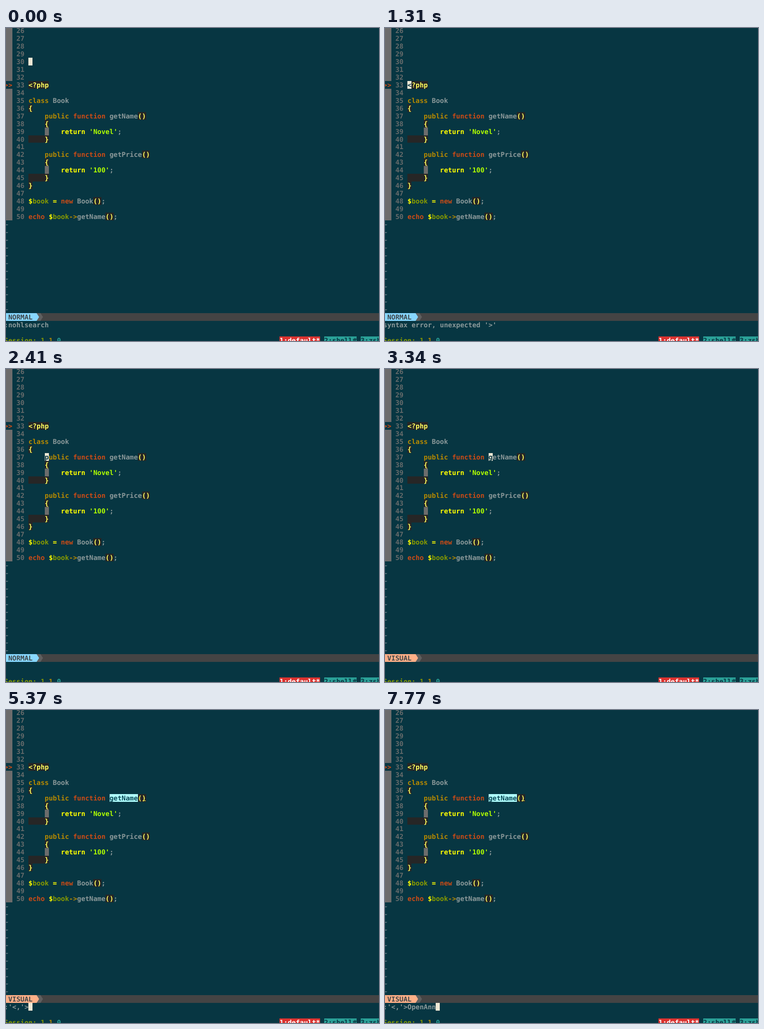
Animation, 817 px wide and 685 px high, one loop 8000 ms. Source, as an HTML page with a canvas:

```html
<!DOCTYPE html>
<html lang="en">
<head>
<meta charset="utf-8">
<title>Editor session</title>
<style>
  html, body { margin: 0; width: 100%; height: 100%; overflow: hidden; background: #073642; }
  canvas { display: block; }
</style>
</head>
<body>
<canvas id="stage" width="817" height="685"></canvas>
<script>
const ctx = document.getElementById('stage').getContext('2d');
const LOOP = 8000, CELL = 8.87, LINE = 16.95, CODE_COL = 6;
const STATUS = 63, COMMAND = 64, SESSION = 66;
const C = {
  bg: '#073642', gutter: '#6c6c6c', dark: '#262626', text: '#8a9899', number: '#666b6b',
  gold: '#b58900', orange: '#cb4b16', green: '#859900', yellow: '#ffff00', pale: '#ffff5f',
  lime: '#afff00', cyan: '#2aa198', red: '#dc322f', cursor: '#eee8d5', selection: '#afffff',
  bar: '#444444', chevron: '#5f5f5f', match: '#586e75'
};

const FIRST = 26;
const code = `






<?php

class Book
{
    public function getName()
    {
        return 'Novel';
    }

    public function getPrice()
    {
        return '100';
    }
}

$book = new Book();

echo $book->getName();`.split('\n');

const tokenColor = {
  '<?php': C.pale, class: C.gold, public: C.gold, function: C.orange, return: C.yellow,
  new: C.orange, echo: C.orange, $: C.yellow, book: C.green, '=': C.yellow, '->': C.gold
};

// [time, row, code column] of the cursor in the buffer
const moves = [
  [0, 30, 0], [780, 31, 0], [1080, 32, 0], [1310, 33, 0], [1480, 34, 0], [1630, 35, 0],
  [1800, 36, 0], [1960, 37, 0], [2410, 37, 4], [2570, 37, 11], [2870, 37, 20],
  [3570, 37, 26], [3810, 37, 28], [4440, 37, 27], [4590, 37, 26]
];
// [time, command line]
const messages = [
  [0, ':nohlsearch'], [1310, "syntax error, unexpected '>'"], [1480, '']
];
const VISUAL_AT = 3340, COMMAND_AT = 5370, SELECT_FROM = 20;
const typed = 'OpenAnn', keyTimes = [6210, 6440, 6610, 6840, 7310, 7620, 7770];

const latest = (list, t) => list.filter(e => e[0] <= t).pop();
const colX = col => -3.9 + col * CELL;
const rowY = row => Math.round(65 + (row - 30) * LINE);

function box(row, col, count, color) {
  const x = Math.round(colX(col));
  ctx.fillStyle = color;
  ctx.fillRect(x, rowY(row), Math.round(colX(col + count)) - x, rowY(row + 1) - rowY(row));
}

function write(row, col, text, color, back) {
  if (back) box(row, col, text.length, back);
  ctx.fillStyle = color;
  [...text].forEach((ch, i) => ctx.fillText(ch, colX(col + i), rowY(row) + 14));
}

function cursor(row, col, ch = ' ') {
  write(row, col, ch, C.bg, C.cursor);
}

function codeLine(row, line) {
  for (const m of line.matchAll(/<\?php|->|'[^']*'|[a-z]\w*|\S/gi)) {
    const s = m[0], bracket = /^[{}()]$/.test(s);
    const color = bracket ? C.pale : s[0] === "'" ? C.lime : tokenColor[s] || C.text;
    write(row, CODE_COL + m.index, s, color, (bracket || s === '<?php') && C.dark);
  }
}

function buffer() {
  code.forEach((line, i) => {
    const row = FIRST + i;
    if (row === 33) write(row, 0, '>>', C.orange);
    else box(row, 0, 2, C.gutter);
    write(row, 3, String(row), C.number);
    if (line.includes('return')) box(row, CODE_COL + 4, 1, C.gutter);
    if (line === '    }') box(row, CODE_COL, 4, C.dark);
    codeLine(row, line);
  });
  for (let row = FIRST + code.length; row < STATUS; row++) write(row, 0, '~', '#657b83');
}

function arrow(x, color) {
  const y = rowY(STATUS), end = rowY(COMMAND);
  ctx.fillStyle = color;
  ctx.beginPath();
  ctx.moveTo(0, y);
  ctx.lineTo(x, y);
  ctx.lineTo(x + 5.5, (y + end) / 2);
  ctx.lineTo(x, end);
  ctx.lineTo(0, end);
  ctx.fill();
}

function statusBar(visual) {
  box(STATUS, 0, 93, C.bar);
  arrow(75.5, C.chevron);
  arrow(67, visual ? '#ffaf87' : '#87d7ff');
  write(STATUS, 1, visual ? 'VISUAL' : 'NORMAL', '#3f4649');
}

function sessionBar() {
  write(SESSION, 0, 'Session: 1', C.green);
  write(SESSION, 11, '1', C.gold);
  write(SESSION, 13, '0', C.cyan);
  write(SESSION, 68, '1:default*', '#ffffff', C.red);
  write(SESSION, 79, '2:shell#', C.bg, C.cyan);
  write(SESSION, 88, '3:zsh', C.bg, C.cyan);
}

function draw(t) {
  const [, row, col] = latest(moves, t);
  const line = code[row - FIRST];
  const visual = t >= VISUAL_AT, command = t >= COMMAND_AT;

  ctx.fillStyle = C.bg;
  ctx.fillRect(0, 0, 817, 685);
  ctx.font = 'bold 14.73px "DejaVu Sans Mono", monospace';
  ctx.textRendering = 'geometricPrecision';
  buffer();

  if (row === 36) write(46, CODE_COL, '}', C.red, C.match);
  if (row === 37 && col === 27) write(37, CODE_COL + 28, ')', C.red, C.match);
  if (visual) {
    write(37, CODE_COL + SELECT_FROM, line.slice(SELECT_FROM, col + 1), '#0b4a58', C.selection);
  }

  statusBar(visual);
  sessionBar();

  if (command) {
    const text = ":'<,'>" + typed.slice(0, keyTimes.filter(k => k <= t).length);
    ctx.fillStyle = C.pale;
    ctx.fillRect(299, rowY(37) + 14, 7, 1);
    write(COMMAND, 0, text, C.text);
    cursor(COMMAND, text.length);
  } else {
    write(COMMAND, 0, latest(messages, t)[1], C.text);
    cursor(row, CODE_COL + col, line[col]);
  }
}

const start = performance.now();
function frame() {
  draw(Math.max(0, performance.now() - start) % LOOP);
  requestAnimationFrame(frame);
}
frame();
</script>
</body>
</html>
```
